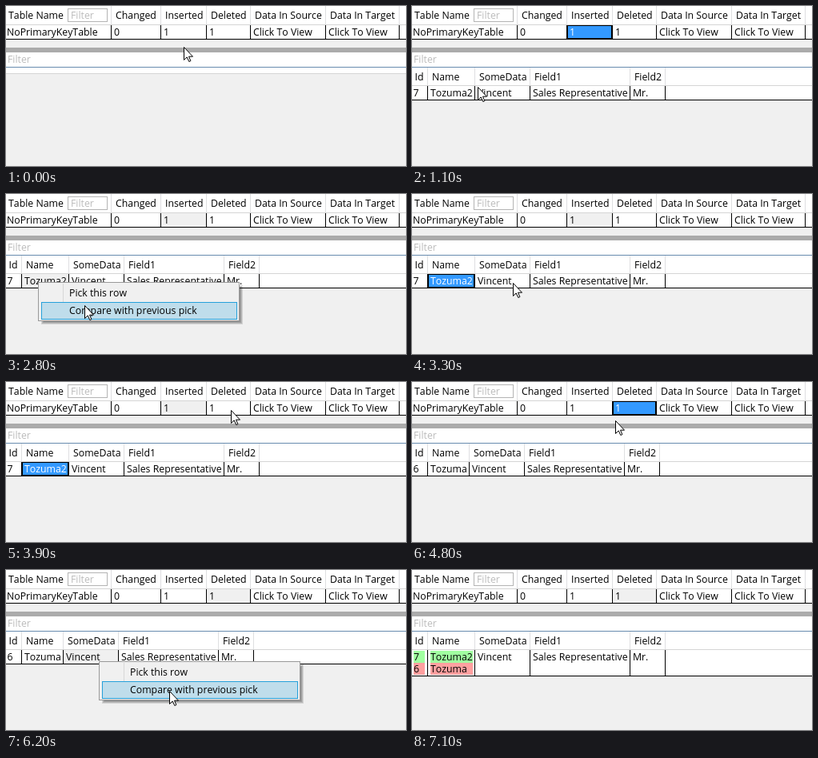
These frames come from a looping animation (500 by 200 pixels, 8100 ms). An HTML page:

```html
<!DOCTYPE html>
<html lang="en">
<head>
<meta charset="utf-8">
<title>Table comparison</title>
<style>
html, body { margin: 0; width: 100%; height: 100%; overflow: hidden; background: #f0f0f0; }
svg { display: block; width: 500px; height: 200px; }
rect { shape-rendering: crispEdges; }
text { font: 12.3px "Open Sans", "Noto Sans", sans-serif; font-kerning: none; white-space: pre; }
</style>
</head>
<body>
<svg id="stage" viewBox="0 0 500 200"></svg>
<script>
const LOOP = 8100, STEP = 100;
const stage = document.getElementById('stage');

// Pointer path: time, x, y
const path = [
  [0, 222, 51], [400, 207, 35], [800, 207, 35], [900, 190, 48], [1000, 136, 84],
  [1100, 82, 101], [1300, 35, 117], [1500, 40, 110], [2100, 40, 110], [2500, 96, 144],
  [2700, 96, 144], [2800, 98, 139], [2900, 100, 124], [3200, 100, 124], [3900, 281, 35],
  [4700, 281, 35], [5300, 116, 114], [5800, 116, 114], [6200, 204, 151],
  [6800, 204, 151], [7100, 500, 174], [LOOP, 500, 174]
];

const upper = {
  top: 0, head: 24, start: -3, lines: [131, 193, 250, 305, 399, 491],
  heads: ['Table Name', 'Changed', 'Inserted', 'Deleted', 'Data In Source', 'Data In Target'],
  cells: ['NoPrimaryKeyTable', '0', '1', '1', 'Click To View', 'Click To View'], height: 17
};
const lower = {
  top: 77, head: 23, start: -2.5, heads: ['Id', 'Name', 'SomeData', 'Field1', 'Field2'], height: 17
};
const inserted = {
  ...lower, lines: [19, 78, 147, 272, 316],
  cells: ['7', 'Tozuma2', 'Vincent', 'Sales Representative', 'Mr.']
};
const deleted = {
  ...lower, lines: [19, 71, 140, 265, 309],
  cells: ['6', 'Tozuma', 'Vincent', 'Sales Representative', 'Mr.']
};

const rect = (x, y, w, h, fill, more = '') =>
  `<rect x="${x}" y="${y}" width="${w}" height="${h}" fill="${fill}" ${more}/>`;
const frame = (x, y, w, h, fill, stroke) =>
  rect(x + .5, y + .5, w - 1, h - 1, fill, `stroke="${stroke}"`);
const label = (x, y, str, fill = '#000') => `<text x="${x}" y="${y}" fill="${fill}">${str}</text>`;

function pointerAt(t) {
  const i = path.findIndex(p => p[0] > t);
  const [t0, x0, y0] = path[i - 1], [t1, x1, y1] = path[i];
  const k = (t - t0) / (t1 - t0);
  return [Math.round(x0 + (x1 - x0) * k), Math.round(y0 + (y1 - y0) * k)];
}

// picked: index of the selected cell; active: whether the grid has focus
function grid({ top, head, start, lines, heads, cells, height }, picked = -1, active = false) {
  const row = top + head;
  let out = rect(0, top, 500, head - 1, '#fff') + rect(0, row - 1, 500, 1, '#d5d5d5')
    + rect(0, row, 500, height, '#fff');
  lines.forEach((line, i) => {
    const left = i ? lines[i - 1] : start;
    const on = i === picked;
    if (on) {
      out += active
        ? frame(left + 1, row, line - left - 1, height, '#39f', '#000')
        : rect(left + 1, row, line - left - 1, height, '#f0f0f0');
    }
    out += label(left + 6, top + 16, heads[i])
      + label(left + 4, row + 13, cells[i], on && active ? '#fff' : '#000')
      + rect(line, top, 1, head - 1, '#dedfe1') + rect(line, row, 1, height, '#000');
  });
  return out + rect(0, row + height, 500, 1, '#000');
}

function comparison() {
  const mark = (x, w, y, str, fill) => rect(x, y, w, 15, fill) + label(x, y + 12, str);
  const cells = ['', '', ...inserted.cells.slice(2)];
  let out = grid({ ...inserted, cells, height: 32 });
  [inserted, deleted].forEach((side, i) => {
    const y = 101 + 15 * i, fill = i ? '#ffa0a0' : '#a0ffa0';
    out += mark(2, 14, y, side.cells[0], fill) + mark(23, 53, y, side.cells[1], fill);
  });
  return out;
}

function menu(x, y, px, py, opacity) {
  let out = '';
  for (let k = 0; k < 4; k++) {
    out += rect(x + 4 + k, y + 4 + k, 252 - 2 * k, 49 - 2 * k, '#000', 'opacity=".12"');
  }
  out += frame(x, y, 252, 49, '#f0f0f0', '#999') + rect(x + 31, y + 2, 1, 45, '#d7d7d7');
  ['Pick this row', 'Compare with previous pick'].forEach((str, i) => {
    const top = y + 3 + 22 * i;
    if (px > x + 3 && py >= top && py < top + 22) {
      out += frame(x + 4, top, 245, 22, '#bfddeb', '#26a0da');
    }
    out += label(x + 39, top + 15, str);
  });
  return `<g opacity="${opacity}">${out}</g>`;
}

function lowerGrid(t) {
  if (t < 700) return rect(0, 77, 500, 7, '#fff') + rect(0, 84, 500, 1, '#d5d5d5');
  if (t < 4200) return grid(inserted, t < 1800 ? -1 : 1, t >= 3200);
  if (t < 6800) return grid(deleted, t < 5600 ? -1 : 2);
  return comparison();
}

function draw(t) {
  const [x, y] = pointerAt(t);
  const picked = t < 700 ? -1 : t < 4200 ? 2 : 3;
  const active = t < 1800 || (t >= 4200 && t < 5600);
  let out = rect(0, 0, 500, 200, '#f0f0f0') + grid(upper, picked, active)
    + frame(77, 3, 50, 17, '#fff', '#b4b4b4') + label(81, 16, 'Filter', '#bbb')
    + rect(0, 52, 500, 6, '#ababab') + rect(0, 58, 500, 18, '#fff')
    + label(2, 71, 'Filter', '#bbb') + rect(0, 76, 500, 1, '#688caf');
  if (y > 58 && y < 76) out += frame(0, 58, 500, 18, 'none', '#7eb4ea');
  out += lowerGrid(t);
  if (t >= 1900 && t < 3200) out += menu(40, 110, x, y, t < 2000 ? .5 : 1);
  if (t >= 5700 && t < 6800) out += menu(116, 114, x, y, t < 5800 ? .5 : 1);
  out += `<path transform="translate(${x} ${y})" fill="#fff" stroke="#000"
    d="M.5 .5V16.5L4.2 12.9 6.8 18.5 8.9 17.6 6.5 12.2H11.5Z"/>`;
  stage.innerHTML = out;
}

let last = -1;
function tick() {
  const t = Math.floor(performance.now() % LOOP / STEP) * STEP;
  if (t !== last) draw(last = t);
  requestAnimationFrame(tick);
}
tick();
</script>
</body>
</html>
```
